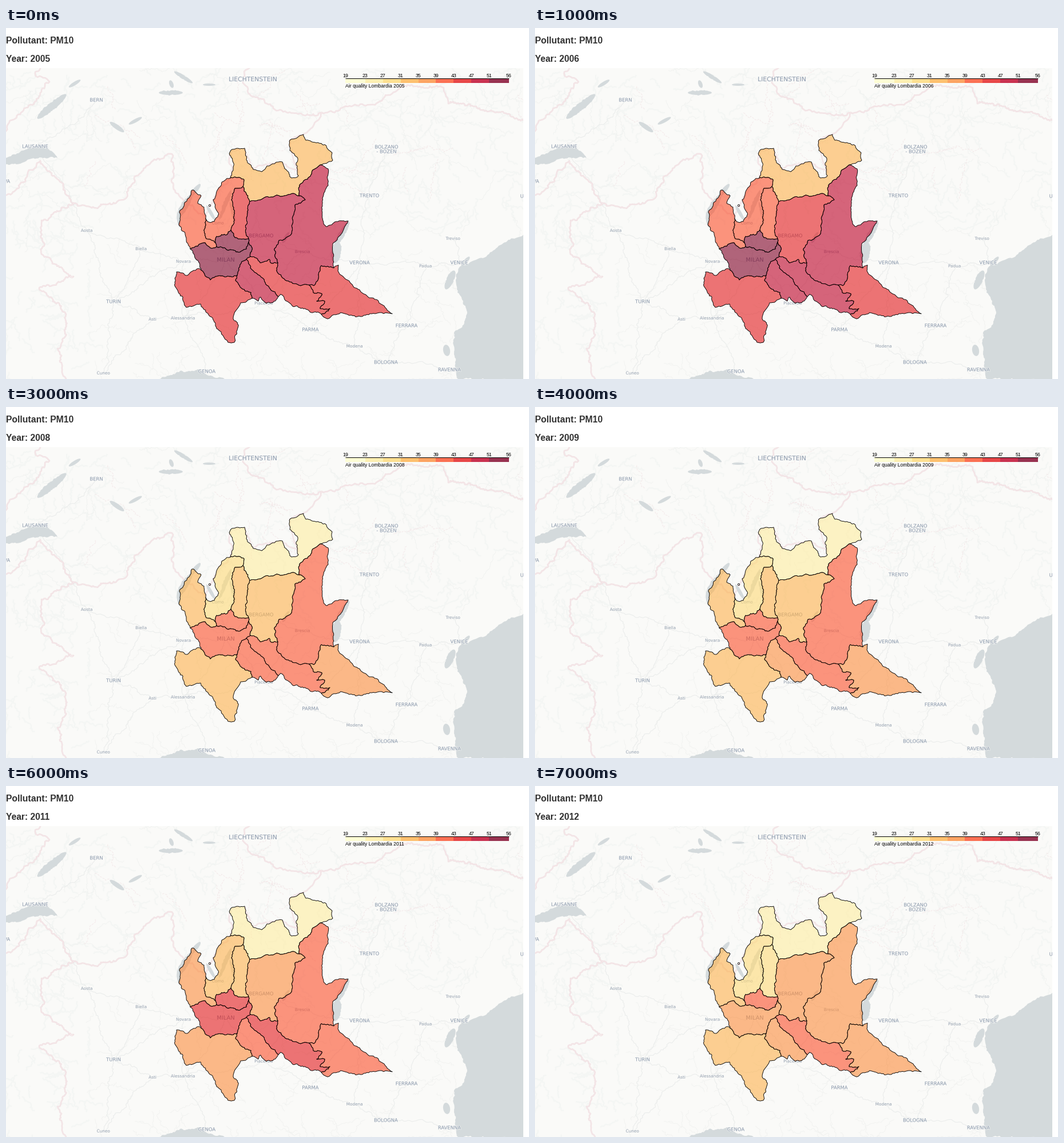
These frames come from a looping animation (914x613 px, 8 s). A matplotlib script:

```python
import numpy as np
import matplotlib.pyplot as plt
from matplotlib import patheffects
from matplotlib.animation import FuncAnimation
from matplotlib.patches import Polygon, Rectangle

W, H, DPI = 914, 613, 64
MAP_W, MAP_TOP = 904, 70
PT = 72 / DPI  # points per pixel
rng = np.random.default_rng(12)

LAND, WATER, BORDER = "#fafaf8", "#d4dadc", "#f0dcdf"
RAMP = ["#ffffcc", "#ffeda0", "#fed976", "#feb24c", "#fd8d3c",
        "#fc4e2a", "#e31a1c", "#bd0026", "#800026"]

fig = plt.figure(figsize=(W / DPI, H / DPI), dpi=DPI, facecolor="white")
ax = fig.add_axes([0, 0, MAP_W / W, (H - MAP_TOP) / H], facecolor=LAND)
ax.set(xlim=(0, MAP_W), ylim=(H, MAP_TOP), xticks=[], yticks=[])
ax.spines[:].set_visible(False)
page = fig.add_axes([0, 0, 1, 1])
page.set(xlim=(0, W), ylim=(H, 0))
page.axis("off")


def rough(pts, amp, step=4):
    """Split long segments at sideways shifted midpoints."""
    out = [pts[0]]
    for a, b in zip(pts[:-1], pts[1:]):
        d = b - a
        size = np.hypot(*d)
        if size > step:
            shift = rng.uniform(-amp, amp) / np.sqrt(size)
            mid = (a + b) / 2 + shift * np.array([-d[1], d[0]])
            out.extend(rough(np.array([a, mid, b]), amp, step)[1:])
        else:
            out.append(b)
    return np.array(out)


def path(*xy, amp=0.5):
    return rough(np.array(xy, float).reshape(-1, 2), amp)


def stroke(pts, color, width, **kw):
    ax.plot(pts[:, 0], pts[:, 1], color=color, lw=width * PT, **kw)


def area(pts, z=1.5):
    ax.add_patch(Polygon(pts, fc=WATER, ec="none", zorder=z))


def lake(x, y, length, width, angle):
    """A tapering lake; the angle is measured upwards from the right."""
    t = np.linspace(0, 2 * np.pi, 25)
    u, v = length / 2 * np.cos(t), width / 2 * np.sin(t)
    c, s = np.cos(np.radians(angle)), np.sin(np.radians(angle))
    area(rough(np.c_[x + u * c + v * s, y - u * s + v * c], 0.5))


def scatter(count, x, y, size, color, **kw):
    """Short crooked lines at random places and angles."""
    for _ in range(count):
        px, py, a = rng.uniform(*x), rng.uniform(*y), rng.uniform(0, np.pi)
        r = rng.uniform(*size)
        stroke(path(px, py, px + r * np.cos(a), py + r * np.sin(a), amp=1),
               color, **kw)


# Valleys in the mountains, lanes on the plain, dashed local limits
scatter(320, (0, MAP_W), (MAP_TOP, 340), (10, 50), "#f4f6f4", width=2.2, zorder=0.5)
scatter(60, (0, 150), (300, H), (10, 50), "#f4f6f4", width=2.2, zorder=0.5)
scatter(90, (0, MAP_W), (MAP_TOP, 340), (25, 70), "#f0f2f0", width=0.8, zorder=0.8)
scatter(160, (140, 790), (350, H), (15, 60), "#f1f2f0", width=0.8, zorder=0.8)
scatter(35, (80, MAP_W), (MAP_TOP, 260), (30, 90), "#f4e8e9", width=0.9,
        ls=(0, (4, 2)), zorder=1.2)

# Town labels
TOWNS = [
    ("LIECHTENSTEIN", 431, 90), ("BERN", 158, 126), ("LAUSANNE", 51, 207),
    ("TRENTO", 635, 293), ("BOLZANO", 665, 208), ("- BOZEN", 665, 216),
    ("VERONA", 618, 410), ("VENICE", 792, 410), ("TURIN", 188, 478),
    ("MILAN", 384, 405), ("BERGAMO", 446, 363), ("PARMA", 532, 527),
    ("FERRARA", 700, 520), ("BOLOGNA", 664, 584), ("RAVENNA", 775, 597),
    ("GENOA", 351, 600), ("GENEVA", -10, 268), ("UDINE", 912, 294),
    ("Aosta", 141, 354), ("Biella", 236, 386), ("Novara", 310, 408),
    ("Como", 370, 341), ("Brescia", 518, 391), ("Treviso", 781, 368),
    ("Padua", 733, 416), ("Asti", 256, 509), ("Alessandria", 309, 507),
    ("Piacenza", 450, 481), ("Modena", 609, 556), ("Cuneo", 170, 603),
]
BIG = {"LIECHTENSTEIN": 10.8, "MILAN": 9.9}
halo = [patheffects.withStroke(linewidth=1.6 * PT, foreground=LAND, alpha=0.8)]
for name, x, y in TOWNS:
    caps = name.isupper()
    ax.text(x, y, name, fontsize=BIG.get(name, 8.4 if caps else 7.3) * PT,
            family="DejaVu Sans", ha="center", va="center", clip_on=True,
            color="#8d9bae" if caps else "#9ba6b4", path_effects=halo, zorder=2)

# Roads between neighbouring towns
SPOT = {name: (x, y) for name, x, y in TOWNS}
ROADS = [
    "TURIN Novara MILAN BERGAMO Brescia VERONA Padua VENICE Treviso",
    "TURIN Asti Alessandria Piacenza PARMA Modena BOLOGNA RAVENNA",
    "MILAN Piacenza Brescia", "Aosta Biella Novara Alessandria GENOA",
    "Asti Cuneo TURIN Biella", "PARMA VERONA TRENTO BOLZANO",
    "VERONA Modena", "Padua FERRARA BOLOGNA", "Como MILAN Alessandria",
    "BERN LAUSANNE Aosta TURIN",
]
for road in ROADS:
    stops = [v for name in road.split() for v in SPOT[name]]
    stroke(path(*stops, amp=0.7), "#ebedec", 1.1, zorder=1)

# National borders
FRONTIERS = [
    path(0, 292, 40, 248, 60, 232, 84, 258, 118, 306, amp=0.8),
    path(118, 306, 178, 308, 205, 300, 228, 258, 265, 228, 290, 220, 290, 270,
         305, 296, 349, 331, 372, 279, 392, 262, 391, 222, 408, 212, amp=0.8),
    path(418, 212, 430, 245, 486, 237, 512, 252, 496, 196, 520, 185, 552, 148),
    path(552, 148, 650, 130, 700, 102, 765, 107, 773, 132, 904, 161, amp=0.8),
    path(425, 70, 414, 92, 426, 116, 510, 150, 552, 148, amp=0.8),
    path(118, 306, 62, 336, 66, 375, 62, 395, 118, 434, 58, 456, 105, 500,
         90, 560, 105, 613, amp=0.8),
    path(0, 180, 62, 108, 76, 94, 52, 84, 60, 70, amp=0.8),
]
for line in FRONTIERS:
    stroke(line, BORDER, 2.4, zorder=1.3)
    stroke(line, "#f8eff0", 0.8, zorder=1.35)

# Sea, lagoons and lakes
area(path(904, 361, 864, 379, 821, 405, 794, 416, 786, 440, 789, 462, 806, 498,
          800, 518, 784, 530, 783, 570, 790, 613, 904, 613))
area(path(268, 613, 300, 601, 335, 596, 382, 613))
area(path(0, 227, 45, 210, 72, 210, 90, 227, 45, 228, 18, 238, 0, 238))
lake(803, 408, 22, 7, 50)       # Venice lagoon
lake(776, 440, 36, 13, 65)
lake(770, 563, 20, 12, 100)     # Comacchio
lake(80, 137, 66, 13, 40)       # north of the Alps, west to east
lake(120, 97, 24, 6, 32)
lake(194, 173, 30, 8, -35)
lake(226, 162, 26, 6, 28)
lake(288, 113, 42, 8, 0)
lake(289, 98, 14, 7, -70)
lake(310, 86, 38, 7, -32)
lake(355, 99, 22, 4, 0)
lake(330, 284, 30, 8, 50)       # south of the Alps, west to east
lake(312, 311, 46, 13, 58)
lake(302, 336, 22, 6, 100)
lake(358, 323, 30, 6, -60)
lake(383, 309, 56, 7, 68)
lake(396, 321, 36, 5, -75)
lake(489, 366, 22, 6, 60)
lake(587, 360, 50, 11, 60)
lake(577, 392, 38, 17, 80)

# Corners where provinces meet, and the borders between them
NODES = dict(
    A=(392, 262), B=(414, 277), C=(426, 303), D=(512, 293), E=(549, 239),
    F=(349, 333), G=(366, 375), H=(368, 382), I=(393, 353), K=(424, 368),
    L=(424, 374), M=(322, 386), N=(341, 423), O=(404, 432), P=(420, 404),
    Q=(427, 399), R=(430, 472), S=(476, 469), T=(475, 410), U=(530, 449),
    V=(573, 419), X=(551, 500))
borders = {}


def edge(ends, *via, amp=0.5):
    a, b = ends
    line = path(*NODES[a], *via, *NODES[b], amp=amp)
    borders[a + b], borders[b + a] = line, line[::-1]


def ring(nodes):
    return np.vstack([borders[a + b] for a, b in zip(nodes, nodes[1:] + nodes[0])])


edge("AE", 398, 240, 391, 222, 395, 212, 417, 210, 420, 230, 432, 247, 447, 251,
     456, 241, 483, 234, 490, 248, 499, 262, 511, 258, 507, 236, 510, 228, 496, 214,
     496, 196, 520, 186, 524, 196, 545, 200, 560, 206, 570, 218, 571, 231)
edge("EV", 563, 246, 563, 275, 553, 297, 555, 341, 561, 347, 577, 338, 598, 337,
     582, 364, 571, 377, amp=0.35)
edge("VX", 581, 414, 580, 424, 600, 442, 632, 469, 655, 482, 675, 499, 645, 499,
     600, 502, 585, 497, 562, 508)
edge("XS", 518, 489, 500, 485, 480, 465)
edge("SR", 472, 475, 455, 481, 445, 470, 441, 477)
edge("RN", 410, 480, 397, 508, 406, 521, 401, 536, 399, 549, 388, 549, 370, 526,
     363, 511, 340, 482, 315, 488, 298, 455, 295, 437, 298, 426, 317, 432, 336, 420)
edge("NM", 333, 405)
edge("MF", 313, 360, 302, 343, 303, 322, 322, 293, 325, 283, 341, 293, 335, 306,
     346, 313)
edge("FA", 355, 339, 364, 338, 371, 323, 362, 300, 372, 279, 384, 265)
edge("AB", 400, 260, 416, 265)
edge("BC", 416, 285)
edge("CD", 450, 297, 503, 289)
edge("DE", 515, 272, 527, 264, 536, 248)
edge("BI", 400, 280, 394, 300, 399, 322)
edge("CK", 422, 320, 419, 357)
edge("DT", 523, 300, 505, 309, 497, 362, 477, 371, 469, 388)
edge("FG", 347, 351, 350, 368)
edge("GH")
edge("GI", 368, 364, 386, 361)
edge("IK", 400, 366)
edge("KL")
edge("LH", 420, 386, 402, 391)
edge("MH", 348, 375, 357, 384)
edge("LQ", 429, 382)
edge("QP")
edge("PO", 412, 408)
edge("NO", 357, 440, 366, 434)
edge("OR", 401, 441, 412, 455, 428, 462)
edge("PS", 427, 419, 449, 437, 462, 456)
edge("QT", 438, 402, 444, 410, 460, 404, 464, 411)
edge("TU", 475, 428, 515, 450)
edge("UV", 538, 450, 549, 424, 551, 415)
edge("UX", 537, 462, 552, 464, 543, 477, 557, 477, 549, 490, 566, 490)

# Each province is a walk from corner to corner
PROVINCES = ["AEDCB", "MFGH", "FABIG", "BCKI", "CDTQLK", "EVUTD",
             "GIKLH", "NMHLQPO", "PSRO", "QTUXSP", "VXU", "NOR"]
shapes = [ax.add_patch(Polygon(ring(nodes), ec="black", lw=0.9 * PT,
                               joinstyle="round", zorder=3))
          for nodes in PROVINCES]
ax.add_patch(plt.Circle((356, 310), 1.6, fc="none", ec="black", lw=0.8 * PT, zorder=3))

# Colour class of each province by year, in the order of PROVINCES
CLASSES = {
    2005: "355677887666",
    2006: "355567887766",
    2007: "244466876655",
    2008: "132335555543",
    2009: "132335554543",
    2010: "032234444433",
    2011: "143345665654",
    2012: "132244544543",
}
YEARS = list(CLASSES)


def write(text, x, y, size, color="black", **kw):
    return page.text(x, y, text, fontsize=size * PT, family="Liberation Sans",
                     color=color, va="baseline", **kw)


# Legend: values map linearly onto the bar
LEFT, RIGHT, BAR = 593, 879, 88.2
STOPS = np.linspace(19, 56, len(RAMP) + 1)
STOPS[1:-1] = np.linspace(23.5, 51.5, len(RAMP) - 1)
xs = np.interp(STOPS, [19, 56], [LEFT, RIGHT])
for left, right, color in zip(xs[:-1], xs[1:], RAMP):
    page.add_patch(Rectangle((left, BAR), right - left, 7.3, fc=color, alpha=0.8, lw=0))
page.plot([LEFT, RIGHT], [BAR, BAR], color="black", lw=PT, solid_capstyle="butt")
for value, x in zip(STOPS, xs):
    write(str(int(value)), x, 86, 8.8, ha="center")
caption = write("", LEFT, 103.6, 8.6)
write("Pollutant: PM10", 0, 27.3, 15.7, "#303030", weight="bold")
heading = write("", 0, 58.8, 15.6, "#303030", weight="bold")


def draw(i):
    year = YEARS[i]
    heading.set_text(f"Year: {year}")
    caption.set_text(f"Air quality Lombardia {year}")
    for shape, level in zip(shapes, CLASSES[year]):
        shape.set_facecolor((RAMP[int(level)], 0.6))
    return [heading, caption, *shapes]


anim = FuncAnimation(fig, draw, frames=len(YEARS), interval=1000,
                     repeat=True, repeat_delay=0)
plt.show()
```
